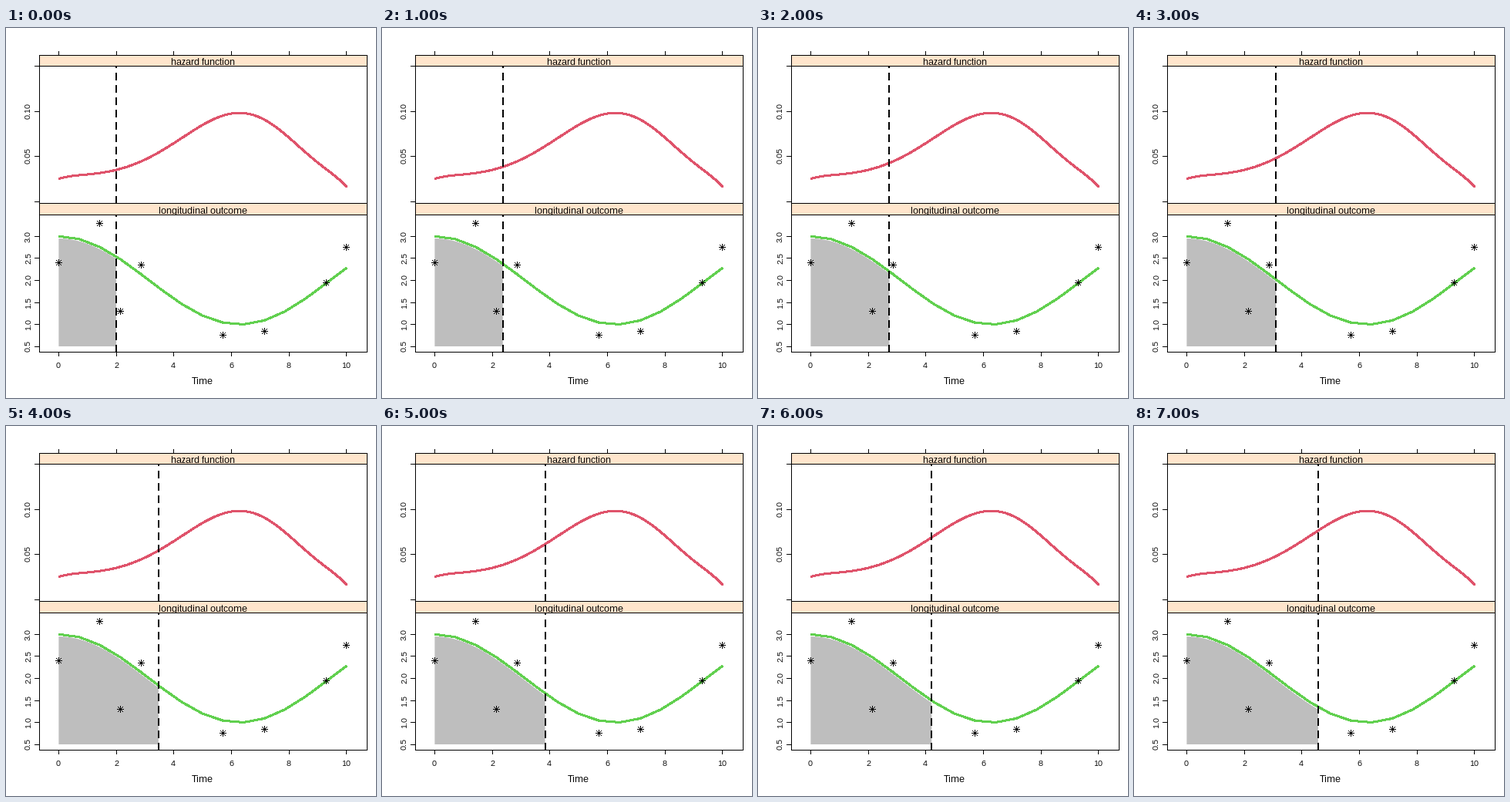
A matplotlib script that plays this animation: 480x480 px, repeating every 8000 ms.

```python
import numpy as np
import matplotlib.pyplot as plt
from matplotlib.animation import FuncAnimation
from matplotlib.patches import Rectangle

SIZE = 480
LEFT, RIGHT = 43, 468
STRIPS = [(35, 49, "hazard function"), (227, 242, "longitudinal outcome")]
PANEL_H = 178
FRAMES, STEP_MS = 8, 1000
T_START, T_STEP = 2, 11 / 30

plt.rcParams.update({"font.family": "Liberation Sans",
                     "text.hinting": "default", "text.hinting_factor": 1})
fig = plt.figure(figsize=(SIZE / 72, SIZE / 72), dpi=72, facecolor="white")
ax = fig.add_axes([0, 0, 1, 1])
ax.set_xlim(0, SIZE)
ax.set_ylim(SIZE, 0)
ax.axis("off")


def px(t):
    return 68.37 + 37.35 * t


def py_hazard(v):
    return 225.2 - 1168 * v


def py_outcome(v):
    return 441.8 - 57.2 * v


def outcome(t):
    return 2 + np.cos(t / 2)


def block(x, y, w, h, color="black", z=5):
    """Fill a rectangle of whole pixels."""
    return ax.add_patch(Rectangle((x, y), w, h, fc=color, lw=0, zorder=z))


def curve(x, y, color):
    # without antialiasing a 2 px stroke covers 3 pixel rows
    ax.plot(x, y, color=color, lw=2, zorder=3, antialiased=False,
            solid_capstyle="butt", solid_joinstyle="round")


def label(x, y, text, size, rotation=0):
    return ax.text(x, y, text, fontsize=size, rotation=rotation, ha="center",
                   va="baseline", rotation_mode="anchor", zorder=4)


def star(x, y):
    block(x - 4, y, 9, 1)
    block(x, y - 4, 1, 9)
    for d in range(-3, 4):
        block(x + d, y + d, 1, 1)
        block(x + d, y - d, 1, 1)


# panels, strips and titles
for top, bottom, title in STRIPS:
    strip = block(LEFT, top, RIGHT - LEFT, bottom - top, "#FFE5CC", 1)
    label(255.5, bottom - 1, title, 12).set_clip_path(strip)
    for y in (top, bottom, bottom + PANEL_H):
        block(LEFT, y, RIGHT - LEFT + 1, 1)
for x in (LEFT, RIGHT):
    block(x, 35, 1, 386)

# axes
for t in range(0, 11, 2):
    x = int(px(t))
    block(x, 30, 1, 5)
    block(x, 421, 1, 5)
    label(x, 441, str(t), 10)
for i in range(4):
    y = int(py_hazard(0.05 * i))
    block(37, y, 6, 1)
    if i in (1, 2):
        label(32, y, f"{0.05 * i:.2f}", 10, 90)
for v in np.arange(0.5, 3.1, 0.5):
    y = int(py_outcome(v))
    block(37, y, 6, 1)
    label(32, y, f"{v:.1f}", 10, 90)
label(255, 462, "Time", 12)

# hazard: smooth polynomial through its values at t = 0..10 (thousandths)
knots = [25.3, 30.1, 35.5, 46.2, 65.3, 85.2, 97.4, 93.8, 70.7, 43.3, 16.3]
hazard = np.polynomial.Polynomial.fit(np.arange(11), knots, 8)
ts = np.linspace(0, 10, 60)
curve(px(ts), py_hazard(hazard(ts) / 1000), "#DF536B")

# outcome on a coarse grid, with its observations
grid = np.linspace(0, 10, 15)
curve(px(grid), py_outcome(outcome(grid)), "#61D04F")
for k, v in zip([0, 2, 3, 4, 8, 10, 13, 14],
                [2.4, 3.3, 1.3, 2.35, 0.75, 0.85, 1.95, 2.75]):
    star(int(px(grid[k])), int(py_outcome(v)))

# moving parts
area = ax.fill([0], [0], color="#BEBEBE", lw=0, zorder=2)[0]
cursors = [ax.plot([0, 0], [bottom + PANEL_H, bottom + 1], color="black", lw=2,
                   ls=(0.5, (5, 3)), dash_capstyle="butt", zorder=4.5)[0]
           for _, bottom, _ in STRIPS]


def update(i):
    t = T_START + T_STEP * i
    ts = np.linspace(0, t, 25)
    xs, ys = px(ts), py_outcome(outcome(ts) - 0.05)
    area.set_xy(np.column_stack([np.r_[xs, xs[-1], xs[0]],
                                 np.r_[ys, 413, 413]]))
    for cursor in cursors:
        cursor.set_xdata([round(px(t))] * 2)
    return [area, *cursors]


anim = FuncAnimation(fig, update, frames=FRAMES, interval=STEP_MS,
                     repeat=True, repeat_delay=0, blit=False)
plt.show()
```
